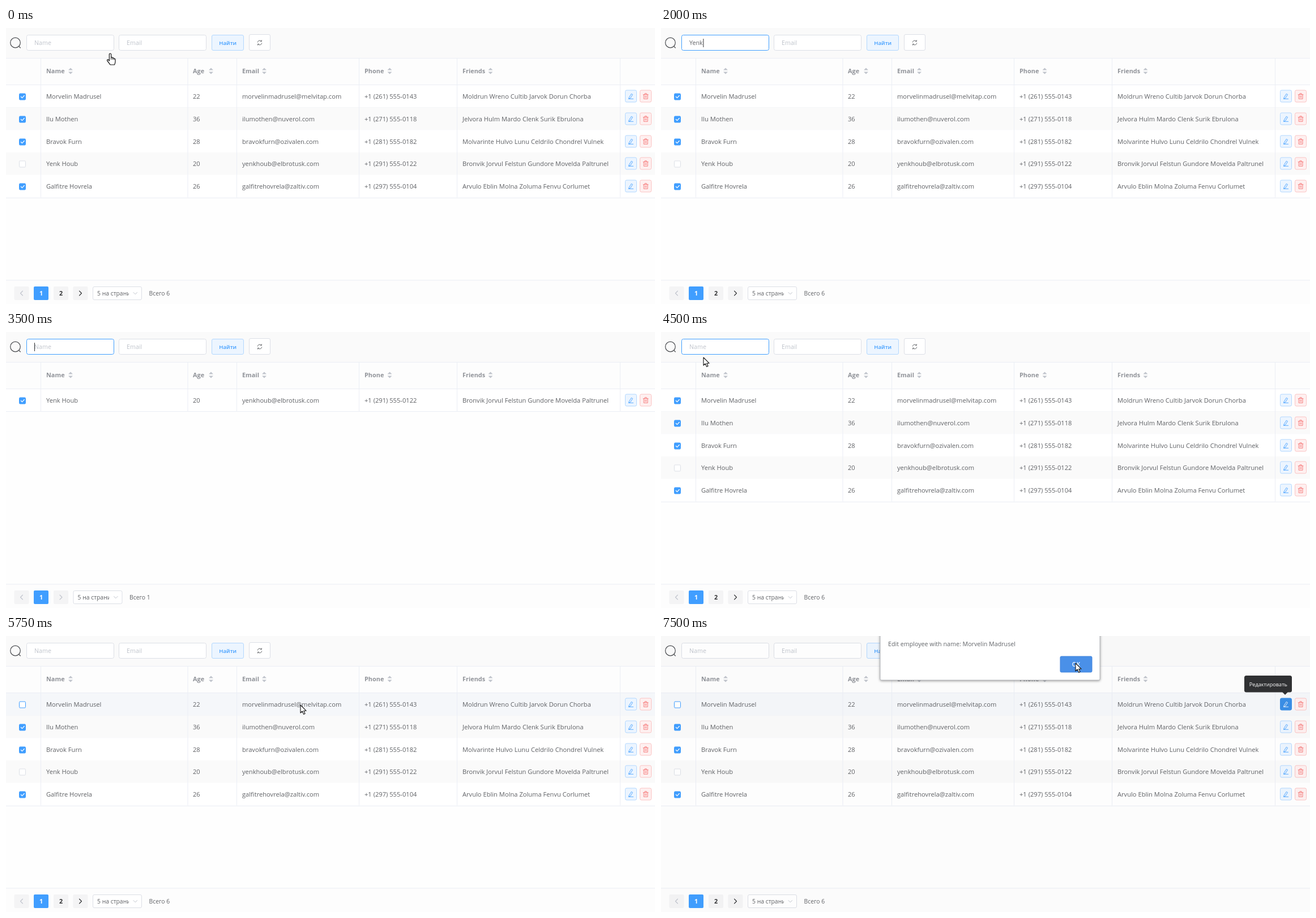
These frames come from a looping animation (1146 by 488 pixels, 8000 ms). An HTML page:

```html
<!DOCTYPE html>
<html lang="ru">
<head>
<meta charset="utf-8">
<title>Employee table</title>
<style>
html, body { margin: 0; width: 100%; height: 100%; overflow: hidden; background: #fff; }
svg { display: block; width: 1146px; height: 488px; font-family: "Open Sans", "Noto Sans", sans-serif; }
text { white-space: pre; }
</style>
</head>
<body>
<svg id="stage" viewBox="0 0 1146 488"></svg>
<script>
const LOOP = 8000, TICK = 250;
const BLUE = '#409eff', LINE = '#ebeef5', BORDER = '#dcdfe6', INK = '#606266', MUTED = '#c0c4cc';
const COLUMNS = [71, 330, 417, 633, 806];
const DIVIDERS = [61.5, 321, 407.5, 623.5, 796.5, 1084.5];
const HEADERS = [['Name', 114], ['Age', 362], ['Email', 456], ['Phone', 677.5], ['Friends', 855.5]];
const PEOPLE = [
  ['Morvelin Madrusel', 22, 'morvelinmadrusel@melvitap.com', '+1 (261) 555-0143', 'Moldrun Wreno Cultib Jarvok Dorun Chorba'],
  ['Ilu Mothen', 36, 'ilumothen@nuverol.com', '+1 (271) 555-0118', 'Jelvora Hulm Mardo Clenk Surik Ebrulona'],
  ['Bravok Furn', 28, 'bravokfurn@ozivalen.com', '+1 (281) 555-0182', 'Molvarinte Hulvo Lunu Celdrilo Chondrel Vulnek'],
  ['Yenk Houb', 20, 'yenkhoub@elbrotusk.com', '+1 (291) 555-0122', 'Bronvik Jorvul Felstun Gundore Movelda Paltrunel'],
  ['Galfitre Hovrela', 26, 'galfitrehovrela@zaltiv.com', '+1 (297) 555-0104', 'Arvulo Eblin Molna Zoluma Fenvu Corlumet'],
];
const QUERY = 'Yenk';
const HEAD_BOTTOM = 100.5, ROW = 39.8;

const rect = (x, y, w, h, fill, stroke = 'none', r = 0, extra = '') =>
  `<rect x="${x}" y="${y}" width="${w}" height="${h}" rx="${r}" fill="${fill}" stroke="${stroke}" ${extra}/>`;
const path = (d, stroke, width = 1, fill = 'none') =>
  `<path d="${d}" fill="${fill}" stroke="${stroke}" stroke-width="${width}" stroke-linecap="round" stroke-linejoin="round"/>`;
const text = (x, y, value, size, fill, extra = '') =>
  `<text x="${x}" y="${y}" font-size="${size}" fill="${fill}" ${extra}>${value}</text>`;
const group = (x, y, content, extra = '') => `<g transform="translate(${x} ${y}) ${extra}">${content}</g>`;
const hLine = (y, width = 1146) => rect(0, y - .5, width, 1, LINE);
const CENTER = 'text-anchor="middle"', BOLD = 'font-weight="700"', SEMI = 'font-weight="600"';

// Value of the last [time, value] entry that has started.
const at = (track, t) => track.reduce((value, [start, next]) => t >= start ? next : value, null);

const TYPED = [[0, ''], [1500, QUERY.slice(0, 2)], [1750, QUERY.slice(0, 3)], [2000, QUERY],
  [3250, QUERY.slice(0, 2)], [3500, '']];
const CARET = [[0, false], [500, true], [750, false], [1000, true], [1250, false], [1500, true],
  [2750, false], [3250, true], [3750, false], [4000, true], [4500, false], [5000, true], [5250, false]];
const POINTER = [[0, ['hand', 184, 45]], [250, ['beam', 130, 27]], [500, null], [4500, ['arrow', 75, 45]],
  [4750, ['arrow', 40, 152]], [5000, ['hand', 32, 128]], [5500, ['arrow', 150, 124]], [5750, ['arrow', 520, 122]],
  [6000, ['arrow', 930, 118]], [6250, ['hand', 1103, 114]], [7000, ['arrow', 1010, 92]],
  [7250, ['arrow', 830, 62]], [7500, ['arrow', 732, 48]]];

function state(t) {
  return {
    typed: at(TYPED, t), caret: at(CARET, t), pointer: at(POINTER, t),
    focused: t >= 500 && t < 5250,
    filtered: t >= 2500 && t < 3750,
    hover: t < 4750 ? -1 : t < 5000 ? 1 : 0,
    fading: t >= 5000 && t < 5250 ? 1 : -1,
    unchecked: t >= 5250,
    editing: t >= 6250,
    dialog: t < 6500 ? 0 : t < 6750 ? .9 : 1,
    dimmed: t >= 7000,
  };
}

function toolbar(s, t) {
  const stroke = s.focused ? BLUE : t === 250 ? MUTED : BORDER;
  const caretX = 50.5 + (s.typed ? s.typed.length * 6.1 : 0);
  return rect(0, 0, 1146, 53, '#fafafa') + hLine(53.5) +
    `<circle cx="16.5" cy="26" r="8.8" fill="none" stroke="#4a4c50" stroke-width="1.2"/>` +
    path('M22.8 32.3L25.3 35', '#4a4c50', 1.2) +
    rect(36.5, 12.5, 154, 27, '#fff', stroke, 3) +
    text(50, 30.3, s.typed || 'Name', 10.7, s.typed ? INK : MUTED) +
    (s.caret ? rect(caretX - .5, 19, 1, 15, '#303133') : '') +
    rect(199.5, 12.5, 154, 27, '#fff', BORDER, 3) +
    text(213, 30.3, 'Email', 10.7, MUTED) +
    rect(363.5, 12.5, 56, 27, '#ecf5ff', '#b3d8ff', 2.5) +
    text(391.7, 30, 'Найти', 9.7, BLUE, CENTER + SEMI) +
    rect(429.5, 11.5, 37, 28, '#fff', BORDER, 2.5) +
    path('M444.3 25.2A3.8 3.8 0 0 1 451 23.4M451.7 26.8A3.8 3.8 0 0 1 445 28.6' +
      'M451.4 21.6V23.7H449.2M444.6 30.4V28.3H446.8', INK, .9);
}

const sorter = x => path(`M${x - 4} 74.5h8l-4 -4zM${x - 4} 77.5h8l-4 4z`, 'none', 0, MUTED);

function checkbox(y, checked, active) {
  return rect(23.5, y - 5.5, 11, 11, checked ? BLUE : '#fff', checked || active ? BLUE : BORDER, 1.5) +
    (checked ? path(`M26.4 ${y}l2.1 2.2l3.8 -4.2`, '#fff', 1.2) : '');
}

function actions(y, active) {
  const pen = active ? '#fff' : BLUE;
  return rect(1093.5, y - 10.5, 20, 21, active ? '#3a8ee6' : '#ecf5ff', active ? '#3a8ee6' : '#b3d8ff', 2.5) +
    path(`M1100.3 ${y + 2.2}l4 -6.4l2.2 1.4l-4 6.3l-2.5 1zM1099.6 ${y + 4.8}h8`, pen, .85) +
    rect(1119.5, y - 10.5, 20, 21, '#fef0f0', '#fbc4c4', 2.5) +
    path(`M1125.2 ${y - 2.7}h8.8M1128 ${y - 2.8}v-1.9h3.2v1.9M1126.2 ${y - 2.5}v7.3h6.8v-7.3` +
      `M1128.5 ${y - .4}v3M1130.7 ${y - .4}v3`, '#f56c6c', .85);
}

function row(person, i, s) {
  const top = HEAD_BOTTOM + i * ROW, y = Math.round(top + 20.4);
  const fill = s.hover === i ? '#f5f7fa' : s.fading === i ? '#f9fafc' : i % 2 ? '#fafafa' : '#fff';
  const original = PEOPLE.indexOf(person);
  const checked = s.filtered || (original !== 3 && !(s.unchecked && i === 0));
  return rect(0, top, 1146, ROW, fill) + hLine(Math.round(top + ROW) + .5) +
    checkbox(y + .5, checked, s.unchecked && i === 0) +
    person.map((value, c) => text(COLUMNS[c], y + 4, value, 11.15, INK)).join('') +
    actions(y - .5, s.editing && i === 0);
}

function table(s) {
  const people = s.filtered ? PEOPLE.filter(p => p[0].startsWith(QUERY)) : PEOPLE;
  const bottom = HEAD_BOTTOM + people.length * ROW;
  return rect(0, 54, 1146, 46, '#fdfdfd') +
    HEADERS.map(([label, x], c) => text(COLUMNS[c], 80, label, 10.9, '#909399', BOLD) + sorter(x)).join('') +
    people.map((p, i) => row(p, i, s)).join('') + hLine(HEAD_BOTTOM) +
    DIVIDERS.map(x => rect(x - .5, 54, 1, bottom - 54, LINE)).join('');
}

function pager(s) {
  const box = (x, fill = '#f4f4f5') => rect(x, 457, 26, 24, fill, 'none', 2);
  const chevron = (x, side, color) => path(`M${x - 2 * side} 465l${4 * side} 4l${-4 * side} 4`, color, 1.1);
  const shift = s.filtered ? -34.5 : 0;
  return rect(0, 446, 1146, 42, '#fdfdfd') + hLine(446) +
    box(14.5) + chevron(27.5, -1, MUTED) +
    box(49, BLUE) + text(62, 473, 1, 10.8, '#fff', CENTER + BOLD) +
    (s.filtered ? '' : box(84) + text(97, 473, 2, 10.8, '#303133', CENTER + BOLD)) +
    group(shift, 0,
      box(118.5) + chevron(131.5, 1, s.filtered ? MUTED : '#303133') +
      rect(153.5, 457.5, 86, 23, '#fff', BORDER, 2.5) +
      `<clipPath id="label"><rect x="160" y="458" width="57" height="22"/></clipPath>` +
      text(161, 473, '5 на странице', 10.4, INK, 'clip-path="url(#label)"') +
      path('M225 467.5l3.3 3.3l3.3 -3.3', MUTED) +
      text(252.5, 473, `Всего ${s.filtered ? 1 : 6}`, 10.4, INK));
}

const tooltip = () => rect(1030, 70, 84, 29.5, '#303133', 'none', 3.5) +
  path('M1097 99h10l-5 5z', 'none', 0, '#303133') +
  text(1072.3, 88.5, 'Редактировать', 9.2, '#fff', CENTER);

function dialog(opacity) {
  const entering = opacity < 1;
  const content = rect(387, -10, 388, 88, '#fff', '#b4b6ba', 2, 'style="filter:drop-shadow(0 1px 2px #0006)"') +
    text(401, 18, `Edit employee with name: ${PEOPLE[0][0]}`, 10.7, '#63666a') +
    rect(705, 36, 56, 28, entering ? '#629fee' : '#4a90e8', entering ? '#629fee' : '#4285dc', 2) +
    text(733, 53.7, 'OK', 10, '#fff', CENTER + SEMI);
  return `<g opacity="${opacity}">${entering
    ? group(581, -8, group(-581, 0, content), 'scale(1.005 1)') : content}</g>`;
}

const CURSORS = {
  arrow: path('M0 0V14L3.2 11L5.6 16.4L8 15.3L5.7 10.2H10Z', '#111', 1.1, '#fff'),
  hand: path('M-1.6 1.7Q-1.6 0 0 0T1.6 1.7V7Q4.1 6.2 4.3 8Q6.6 7.4 6.8 9Q9 8.8 9 11V14Q9 17 7.5 20H0' +
    'Q-1.8 17 -4.8 13.5Q-6.2 11.5 -4.5 10.8Q-3.2 10.6 -1.6 13Z', '#111', 1.2, '#fff') +
    path('M1.6 7v3.5M4.3 8v2.7M6.8 9v2', '#111'),
  beam: path('M-2.5 -7Q0 -7 0 -5.5Q0 -7 2.5 -7M0 -6V6M-2.5 7Q0 7 0 5.5Q0 7 2.5 7', '#333'),
};

function render(t) {
  const s = state(t);
  return rect(0, 0, 1146, 488, '#fefefe') + toolbar(s, t) + table(s) + pager(s) +
    (s.dimmed ? rect(0, 0, 1146, 488, '#000', 'none', 0, 'opacity=".008"') : '') +
    (s.editing ? tooltip() : '') +
    (s.dialog ? dialog(s.dialog) : '') +
    (s.pointer ? group(s.pointer[1], s.pointer[2], CURSORS[s.pointer[0]]) : '');
}

const stage = document.getElementById('stage');
const started = performance.now();
let shown = -1;

function update() {
  const t = Math.floor((performance.now() - started) % LOOP / TICK) * TICK;
  if (t !== shown) stage.innerHTML = render(shown = t);
  requestAnimationFrame(update);
}
update();
</script>
</body>
</html>
```
